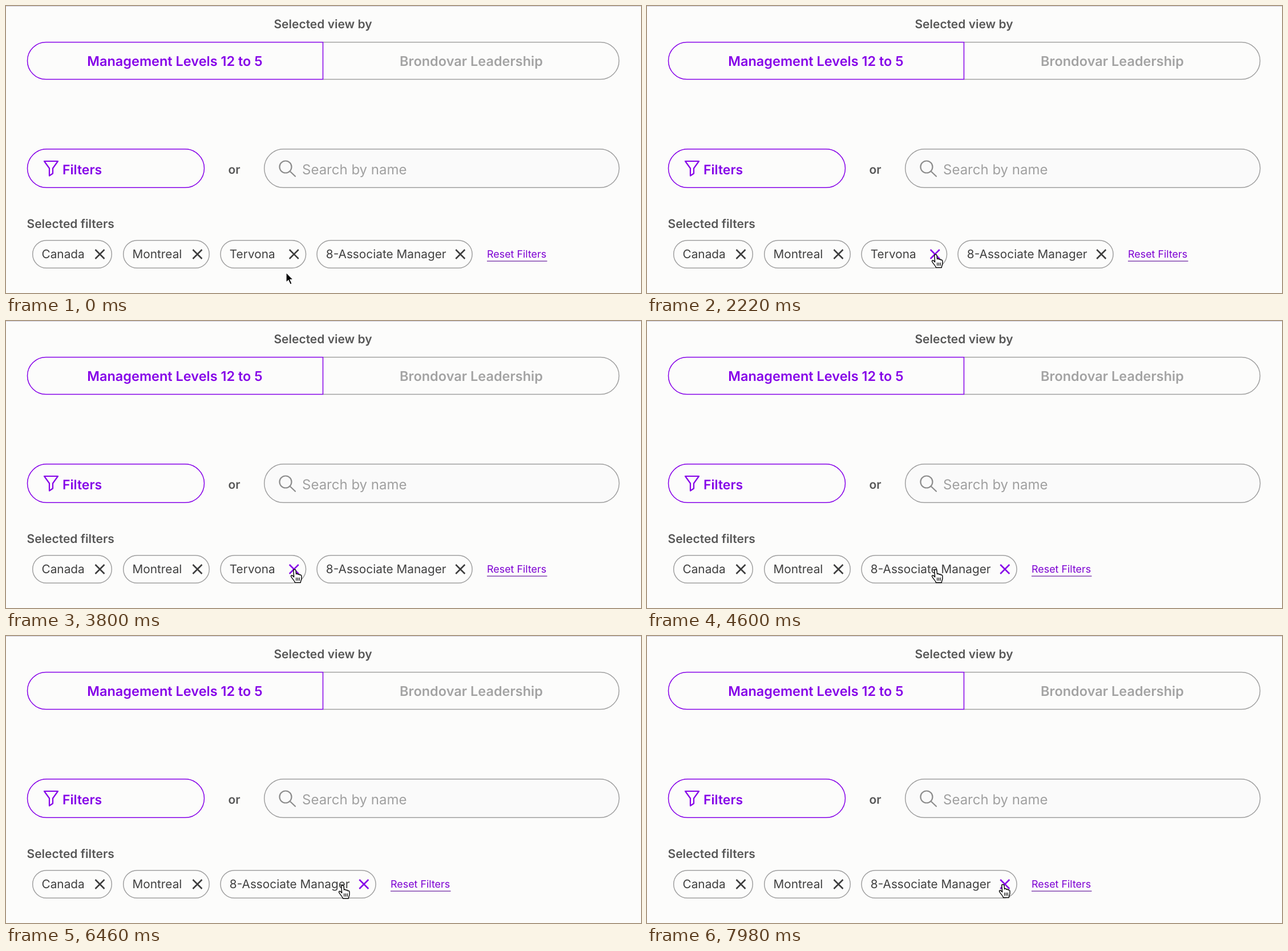
These frames come from a looping animation (1113 by 503 pixels, 8000 ms). An HTML page:

```html
<!DOCTYPE html>
<html lang="en">
<head>
<meta charset="utf-8">
<title>Filter chips</title>
<style>
  html, body { margin: 0; width: 100%; height: 100%; overflow: hidden; background: #fcfcfb; }
  svg { display: block; width: 1113px; height: 503px; }
  text { font-family: Inter, Roboto, sans-serif; font-optical-sizing: none; text-rendering: geometricPrecision; }
  .bold { font-weight: 600; }
  .heading { font-size: 21px; font-weight: 600; fill: #575757; }
  .tab { font-size: 23.5px; font-weight: 600; text-anchor: middle; }
  .purple { fill: #8500e8; }
  .muted { fill: #a3a3a3; }
  .line { fill: none; stroke-width: 1.5; }
  .on { stroke: #8500e8; }
  .off { stroke: #a0a0a0; }
  .chip text { font-size: 20.8px; fill: #404040; }
  .cross { stroke: #3c3c3c; stroke-width: 2.5; }
  .cross.hot { stroke: #8500e8; }
</style>
</head>
<body>
<svg viewBox="0 0 1113 503">
  <rect width="1113" height="1" fill="#cfcddd"/>

  <text class="heading" x="555.5" y="39" text-anchor="middle">Selected view by</text>
  <path class="line off" d="M556 63.5H1042a32.5 32.5 0 0 1 0 65H556"/>
  <path class="line on" d="M555.5 63.5H70a32.5 32.5 0 0 0 0 65H555.5Z"/>
  <text class="tab purple" x="296" y="104.5">Management Levels 12 to 5</text>
  <text class="tab muted" x="815.5" y="104.5">Brondovar Leadership</text>

  <rect class="line on" x="37.5" y="250.8" width="310" height="67.5" rx="33.75"/>
  <path class="line on" style="stroke-width:2.2" stroke-linejoin="round" d="M67 272H91L82 284.5V293.5L76 297.5V284.5Z"/>
  <text class="bold purple" x="99" y="294.5" font-size="23">Filters</text>
  <text class="heading" x="400" y="294" text-anchor="middle">or</text>

  <rect class="line off" x="452.7" y="250.8" width="622" height="67.5" rx="33.75" style="fill:#fafafa"/>
  <g fill="none" stroke="#8c8c8c" stroke-width="2.2" stroke-linecap="round">
    <circle cx="490" cy="282" r="10.5"/>
    <path d="M497.5 289.5L507 298.5"/>
  </g>
  <text x="519" y="294.5" font-size="24" fill="#a0a0a0">Search by name</text>

  <text class="heading" x="36.5" y="388.5">Selected filters</text>
  <g id="chips"></g>
  <g id="reset">
    <text y="441" font-size="17.9" fill="#7d00d2">Reset Filters</text>
    <path d="M0 447.2H105.5" stroke="#6c22a0" stroke-width="1.3"/>
  </g>

  <path id="arrow" d="M0 0V17.5L4 13.8L7.2 21L10.2 19.7L7.1 12.6H12.3Z" fill="#000" stroke="#fff" stroke-width="1.3"/>
  <g id="hand" stroke="#000" stroke-width="1.4" stroke-linejoin="round" stroke-linecap="round">
    <path fill="#fff" d="M-2.2 1C-2.2 -1 1.8 -1 2 1L2.6 7.6C3 6.2 5.8 6.4 6 8.4C6.5 7.1 9 7.5 9.2 9.4C9.8 8.4 12 9 12 11V15C12 18 10.5 19 10.3 22.5H.5C0 19.5 -4 16 -6 12.5C-7.5 10 -5 9 -3.5 10.5L-1.3 12.8Z"/>
    <path stroke-width="1.2" d="M2.7 14V18.8M5.5 14V18.8M8.3 14V18.8"/>
  </g>
</svg>
<script>
const LOOP = 8000, REMOVE_AT = 4200, HOVER_AT = 800;
const $ = id => document.getElementById(id);
const place = (el, x, y) => el.setAttribute('transform', `translate(${x.toFixed(2)} ${y.toFixed(2)})`);
const show = (el, visible) => el.style.display = visible ? '' : 'none';

function addChip(label, x, width) {
  $('chips').insertAdjacentHTML('beforeend', `<g class="chip" transform="translate(${x} 0)">
    <rect class="line off" x=".7" y="410.7" width="${width - 1.4}" height="48.6" rx="24.3"/>
    <text x="16.5" y="442">${label}</text>
    <path class="cross" d="M${width - 29.5} 427l16 16m0 -16l-16 16"/>
  </g>`);
  return $('chips').lastElementChild;
}
addChip('Canada', 46, 140);
addChip('Montreal', 205, 152);
const company = addChip('Tervona', 375.3, 151);
const level = addChip('8-Associate Manager', 544.3, 273.5);
const cross = chip => chip.querySelector('.cross');

// Pointer tip: time, x, y
const path = [
  [0, 491, 467], [1100, 502, 437.5], [1600, 502, 437.5], [1950, 506, 436],
  [5400, 506, 436], [6460, 590, 437.5], [6900, 612, 439], [7400, 624, 436], [LOOP, 624, 436]
];

function pointerAt(t) {
  const i = path.findIndex(key => key[0] > t);
  const [t0, x0, y0] = path[i - 1], [t1, x1, y1] = path[i];
  const u = (t - t0) / (t1 - t0), k = u * u * (3 - 2 * u);
  return [x0 + (x1 - x0) * k, y0 + (y1 - y0) * k];
}

function draw(t) {
  const removed = t >= REMOVE_AT, hovering = t >= HOVER_AT;
  show(company, !removed);
  place(level, removed ? 375.3 : 544.3, 0);
  place($('reset'), removed ? 674 : 843, 0);
  cross(company).classList.toggle('hot', hovering);
  cross(level).classList.toggle('hot', removed);

  const tip = pointerAt(t);
  show($('arrow'), !hovering);
  show($('hand'), hovering);
  place($('arrow'), ...tip);
  place($('hand'), ...tip);
}

const start = performance.now();
function tick() {
  draw((performance.now() - start) % LOOP);
  requestAnimationFrame(tick);
}
tick();
</script>
</body>
</html>
```
